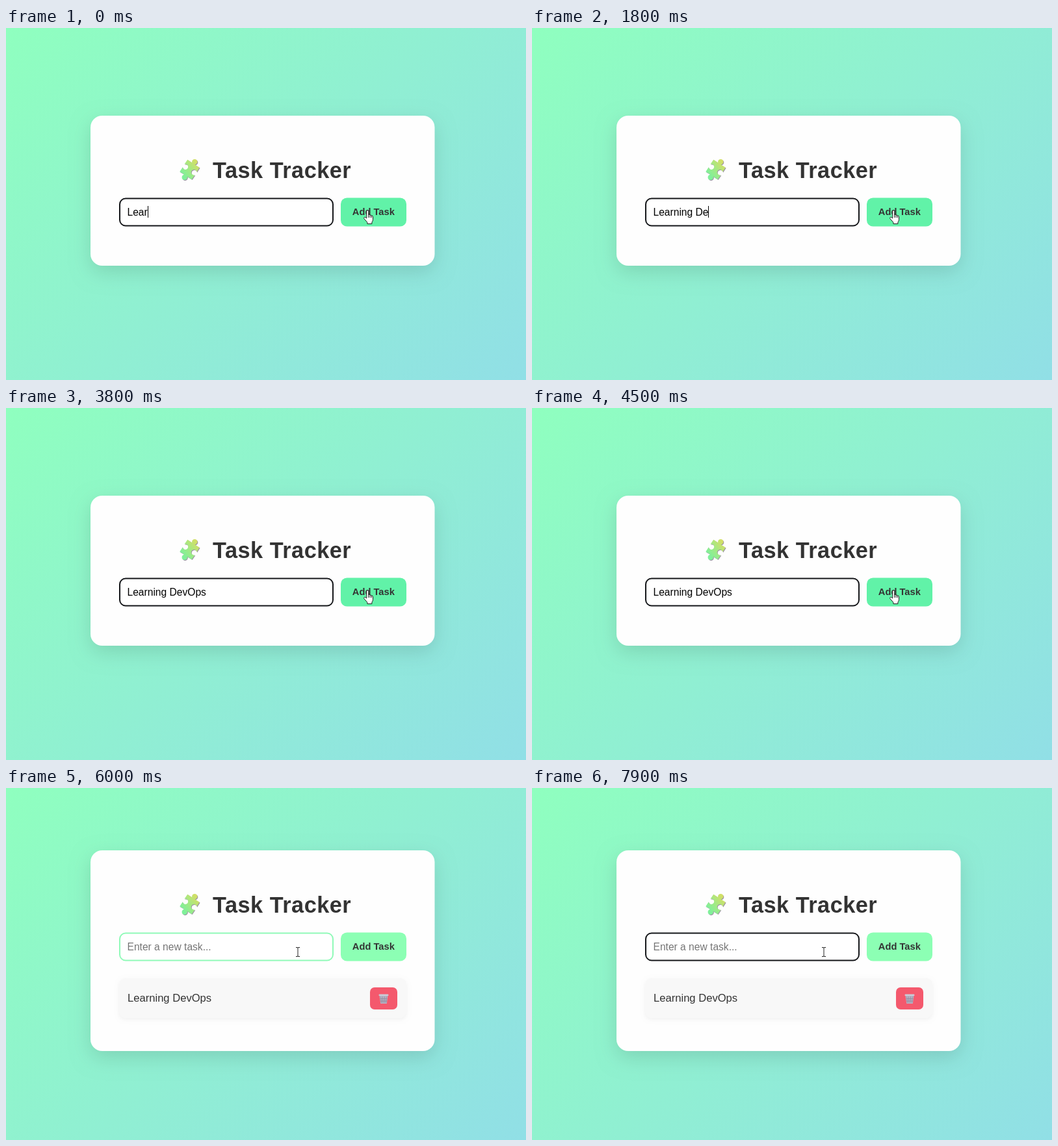
Write an HTML page with a canvas that moves like this. It is 800 px wide and 542 px high and loops after 8000 ms.

```html
<!DOCTYPE html>
<html lang="en">
<head>
<meta charset="utf-8">
<title>Task Tracker</title>
<style>
  html, body { margin: 0; width: 100%; height: 100%; overflow: hidden; }
  canvas { display: block; }
</style>
</head>
<body>
<canvas id="stage" width="800" height="542"></canvas>
<script>
const ctx = document.getElementById('stage').getContext('2d', { alpha: false });
const LOOP = 8000, STEP = 100;
const FONT = '"Liberation Sans", Arial, sans-serif';
const TASK = 'Learning DevOps';
const KEYS = [200, 400, 600, 800, 1100, 1400, 1700, 2000, 2300, 2600, 2900];
const ADD = 4800, MOVE = 5500, MOVE_END = 6000, FOCUS = 6100;
const GREEN = [140, 255, 180], HOVER = [97, 242, 168];

const clamp = v => Math.min(1, Math.max(0, v));
const ease = v => v * v * (3 - 2 * v);
const mix = (a, b, k) => a + (b - a) * k;
const rgb = c => `rgb(${c.join(',')})`;

function box(x, y, w, h, r, fill, stroke) {
  ctx.beginPath();
  ctx.roundRect(x, y, w, h, r);
  ctx.fillStyle = fill;
  ctx.fill();
  if (stroke) {
    ctx.lineWidth = 2;
    ctx.strokeStyle = stroke;
    ctx.stroke();
  }
}

function shadowBox(x, y, w, h, r, fill, dy, blur, alpha) {
  ctx.save();
  ctx.shadowColor = `rgba(0,0,0,${alpha})`;
  ctx.shadowOffsetY = dy;
  ctx.shadowBlur = blur;
  box(x, y, w, h, r, fill);
  ctx.restore();
}

function text(str, x, y, size, color, weight = 400, spacing = 0) {
  ctx.font = `${weight} ${size}px ${FONT}`;
  ctx.letterSpacing = spacing + 'px';
  ctx.fillStyle = color;
  ctx.fillText(str, x, y);
}

function background() {
  const g = ctx.createLinearGradient(64.5, -64.5, 735.5, 606.5);
  g.addColorStop(0, '#8fffbf');
  g.addColorStop(1, '#91dfe6');
  ctx.fillStyle = g;
  ctx.fillRect(0, 0, 800, 542);
}

// A square with tabs on two opposite sides and sockets on the others.
function puzzle(x, y) {
  const p = new Path2D(), s = 11, r = 4.2, n = 2.4;
  p.moveTo(-s, -s);
  p.lineTo(-n, -s);
  p.arc(0, -s - 3.2, r, 2.2, 0.94);
  p.lineTo(s, -s);
  p.lineTo(s, -n);
  p.arc(s - 3.2, 0, r, -0.63, 0.63, true);
  p.lineTo(s, s);
  p.lineTo(n, s);
  p.arc(0, s + 3.2, r, -0.94, -2.2);
  p.lineTo(-s, s);
  p.lineTo(-s, n);
  p.arc(3.2 - s, 0, r, 2.51, -2.51, true);
  p.closePath();

  const draw = (dx, dy, fill) => {
    ctx.save();
    ctx.translate(x + dx, y + dy);
    ctx.rotate(33 * Math.PI / 180);
    ctx.fillStyle = fill;
    ctx.fill(p);
    ctx.restore();
  };
  const g = ctx.createLinearGradient(-4, 13, 6, -14);
  g.addColorStop(0, '#7ff09a');
  g.addColorStop(0.5, '#a5e983');
  g.addColorStop(1, '#d2df66');
  draw(0.9, 0.9, '#9c93a3');
  draw(0, 0, g);
}

function trash(x, y) {
  ctx.save();
  ctx.translate(x, y);
  ctx.fillStyle = '#b9b4c6';
  ctx.beginPath();
  ctx.moveTo(1, 2);
  ctx.lineTo(14, 2);
  ctx.lineTo(12.3, 15);
  ctx.lineTo(2.7, 15);
  ctx.closePath();
  ctx.fill();
  ctx.strokeStyle = '#8f8798';
  ctx.lineWidth = 0.8;
  ctx.beginPath();
  for (let i = 0; i < 4; i++) {
    const a = 3.2 + i * 2.9;
    ctx.moveTo(a, 4);
    ctx.lineTo(mix(a, 7.5, 0.2), 14);
  }
  ctx.moveTo(2, 7.5);
  ctx.lineTo(13, 7.5);
  ctx.moveTo(2.5, 11);
  ctx.lineTo(12.5, 11);
  ctx.stroke();
  box(0, 0.5, 15, 2.6, 1.2, '#c9cbd6');
  ctx.restore();
}

const ARROW = new Path2D('M0 0V14.6L3.4 11.5L5.7 16.7L8 15.7L5.7 10.6H10.2Z');
const HAND = new Path2D('M4.7 13V2.3Q4.7.7 6.2.7T7.7 2.3V7.5Q9.5 6.7 10 8.2' +
  'Q11.9 7.4 12.3 9Q14.5 8.6 14.5 10.7V14.8Q14.5 17.4 12.9 19V21.5H5.9V19.3' +
  'L1.1 13.8Q.2 12.2 1.3 11.4T4.7 13Z');
const FINGERS = new Path2D('M7.7 7.5V12M10 8.2V12M12.3 9V12.3');
const BEAM = new Path2D('M-3 -7H-1Q0 -7 0 -6Q0 -7 1 -7H3M0 -6V6M-3 7H-1Q0 7 0 6Q0 7 1 7H3');

function cursor(kind, x, y) {
  ctx.save();
  ctx.translate(x, y);
  ctx.lineJoin = 'round';
  ctx.lineWidth = 1;
  ctx.strokeStyle = '#222';
  ctx.fillStyle = '#fff';
  if (kind === 'beam') {
    ctx.stroke(BEAM);
  } else {
    const shape = kind === 'hand' ? HAND : ARROW;
    ctx.fill(shape);
    ctx.stroke(shape);
    if (kind === 'hand') ctx.stroke(FINGERS);
  }
  ctx.restore();
}

function caret(t, since, x, y) {
  if ((t - since) % 1000 >= 500) return;
  ctx.fillStyle = '#000';
  ctx.fillRect(Math.round(x), y - 9, 1, 18);
}

function pointer(t) {
  if (t < ADD) return cursor('hand', 550, 280);
  const k = ease(clamp((t - MOVE) / (MOVE_END - MOVE)));
  const x = mix(555.5, 449, k), y = mix(281.5, 252.5, k);
  cursor(x < 504 && y < 266 ? 'beam' : 'arrow', x, y);
}

function render(t) {
  const added = t >= ADD;
  const top = added ? 96 : 135;
  const row = top + 148;
  const focused = !added || t >= FOCUS;

  background();
  shadowBox(130, top, 529.5, added ? 309 : 231, 18, '#fefefe', 10, 30, 0.12);
  puzzle(282.5, top + 83);
  text('Task Tracker', 318, top + 96, 34.3, '#333', 700, 0.5);

  box(175, row - 20.5, 328, 42, 9, '#fff', focused ? '#15171a' : '#90fab8');
  if (added) {
    text('Enter a new task...', 186.5, row + 5.5, 15.6, '#757575');
    if (focused) caret(t, FOCUS, 186.5, row);
  } else {
    const typed = KEYS.filter(k => k <= t);
    const value = TASK.slice(0, 4 + typed.length);
    text(value, 186.5, row + 5.5, 15.6, '#000');
    caret(t, typed.at(-1) ?? 0, 186.5 + ctx.measureText(value).width, row);
  }

  const fade = clamp((t - ADD) / 300);
  box(515, row - 21.5, 101, 44, 9.5, rgb(HOVER.map((c, i) => mix(c, GREEN[i], fade))));
  text('Add Task', 532.8, row + 5, 14.7, '#333', 700);

  if (added) {
    shadowBox(174, 293, 442, 61.5, 10, '#f8f8f8', 2, 6, 0.05);
    text(TASK, 187, 329, 16.6, '#333');
    box(560, 307, 42, 34, 7, '#f4596d');
    trash(573.5, 317);
  }
  pointer(t);
}

function tick() {
  const t = performance.now() % LOOP;
  render(Math.floor(t / STEP) * STEP);
  requestAnimationFrame(tick);
}
tick();
</script>
</body>
</html>
```
